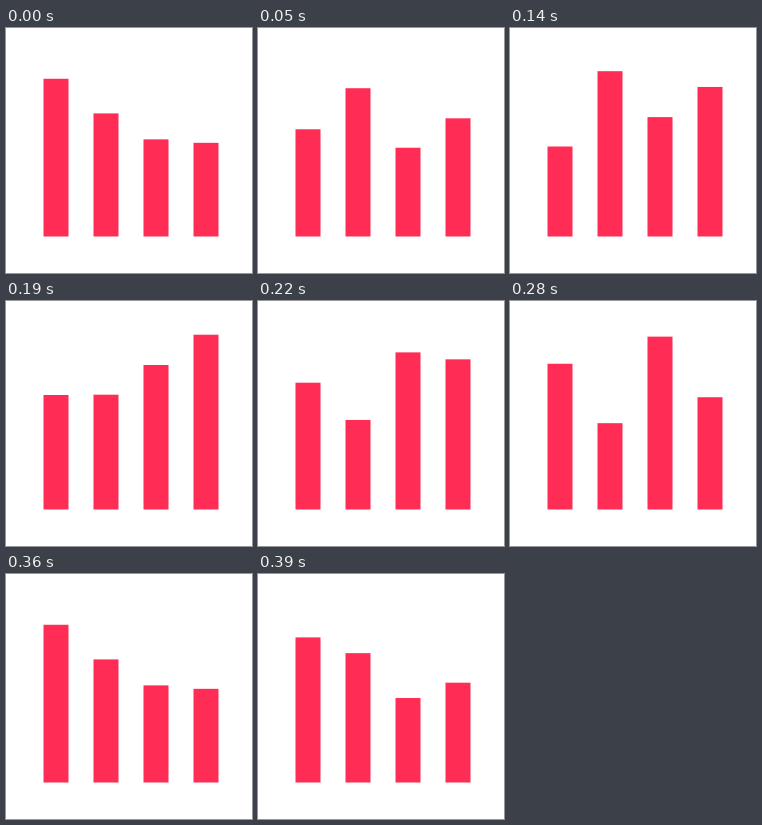
An HTML page with a canvas for the animation above (0.41 s loop, 246x245 px).

```html
<!DOCTYPE html>
<html lang="en">
<head>
<meta charset="utf-8">
<title>Equalizer</title>
<style>
  html, body { margin: 0; width: 100%; height: 100%; overflow: hidden; background: #fff; }
  canvas { display: block; }
</style>
</head>
<body>
<canvas id="stage" width="246" height="245"></canvas>
<script>
const ctx = document.getElementById('stage').getContext('2d');

// Each step advances the bars by 1 or 2 ticks and stays for 20 or 30 ms.
const STEPS = [1, 2, 2, 2, 2, 1, 2, 2, 2, 2, 1, 2, 2, 2, 1];
const LOOP = 410;
const TICKS_PER_CYCLE = 24;
const START = 0.387;

const BASE = 208.5;
const BARS = [
  { x: 37.5, offset: 0 },
  { x: 87.5, offset: 0.6 },
  { x: 137.5, offset: 0.2 },
  { x: 187.5, offset: 0.4 },
];
const KEYS = [[0, 125], [0.33, 175], [0.66, 75], [1, 125]];

function barHeight(phase) {
  const p = phase % 1;
  const i = KEYS.findIndex(([t]) => t > p);
  const [t0, h0] = KEYS[i - 1];
  const [t1, h1] = KEYS[i];
  return h0 + (h1 - h0) * (p - t0) / (t1 - t0);
}

function ticksAt(ms) {
  let end = 0;
  let ticks = -STEPS[0];
  for (const step of STEPS) {
    end += step === 1 ? 20 : 30;
    ticks += step;
    if (ms < end) break;
  }
  return ticks;
}

function draw(ms) {
  const phase = START + ticksAt(ms % LOOP) / TICKS_PER_CYCLE;
  ctx.fillStyle = '#fff';
  ctx.fillRect(0, 0, 246, 245);
  ctx.fillStyle = '#ff2d55';
  for (const { x, offset } of BARS) {
    const h = barHeight(phase + offset);
    ctx.fillRect(x, BASE - h, 25, h);
  }
}

const began = performance.now();
function tick() {
  draw(performance.now() - began);
  requestAnimationFrame(tick);
}
tick();
</script>
</body>
</html>
```
